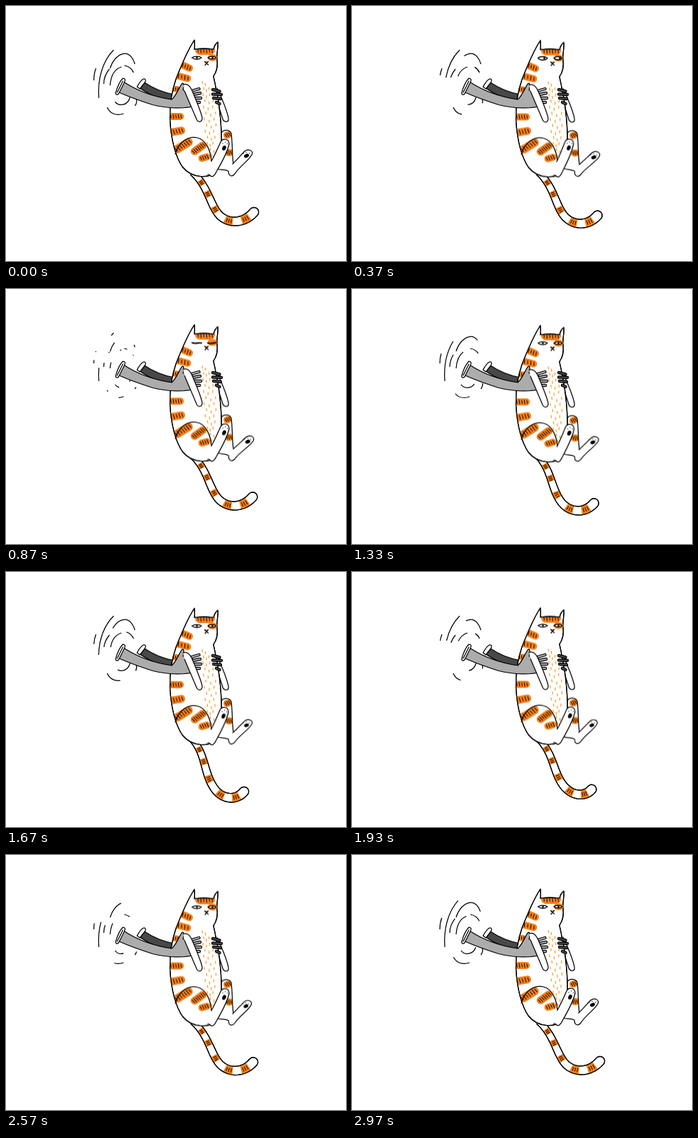
An HTML page for the animation above (3010 ms loop, 480 by 360 pixels).

```html
<!DOCTYPE html>
<html lang="en">
<head>
<meta charset="utf-8">
<title>Held cat</title>
<style>
  html, body { margin: 0; width: 100%; height: 100%; overflow: hidden; background: #fff; }
  svg { display: block; width: 480px; height: 360px; }
  .ink { stroke: #000; stroke-width: 1.25; stroke-linejoin: round; stroke-linecap: round; fill: none; }
  .white { fill: #fff; }
  .light { fill: #acacac; }
  .dark { fill: #484848; }
  .orange { fill: #f77f16; }
  .hatch { stroke: #1c0e02; stroke-width: 1.1; fill: none; }
  .fur { stroke: #f5a030; stroke-width: 1.3; fill: none; }
  .rim { stroke: #000; stroke-width: 4.4; stroke-linecap: round; }
  .skin { stroke-width: 2.2; stroke-linecap: round; }
  .bob { animation: bob 3010ms ease-in-out infinite; }
  .near { transform-origin: 293px 238px; animation: near 3010ms ease-in-out infinite; }
  .far { transform-origin: 317px 238px; animation: far 3010ms ease-in-out infinite; }
  .eye { transform-origin: 280px 73px; animation: blink 3010ms linear infinite; }
  .pupil { animation: glance 3010ms ease-in-out infinite; }
  .lid { opacity: 0; stroke-width: 1.8; animation: lid 3010ms step-end infinite; }
  .swirl path { stroke-linecap: butt; animation: sweep 1505ms linear infinite; }
  @keyframes bob { 0%, 100% { transform: translateY(0); } 46% { transform: translateY(3.4px); } }
  @keyframes near {
    0%, 29%, 72%, 100% { transform: rotate(0deg); }
    12% { transform: rotate(-3deg); }
    44% { transform: rotate(-2deg); }
  }
  @keyframes far {
    0%, 100% { transform: rotate(0deg); }
    12%, 29% { transform: rotate(4deg); }
    50% { transform: rotate(2deg) scale(0.97); }
    72% { transform: rotate(1deg) scale(0.92); }
  }
  @keyframes blink {
    0%, 6%, 38%, 100% { transform: scaleY(1); }
    11%, 23% { transform: scaleY(1.25); }
    27%, 32% { transform: scaleY(0.1); }
  }
  @keyframes glance { 0%, 6%, 36%, 100% { transform: translateX(0); } 12%, 24% { transform: translateX(2px); } }
  @keyframes lid { 0%, 32% { opacity: 0; } 26.5% { opacity: 1; } }
  /* the gap opens from each line's start, then the line regrows behind it */
  @keyframes sweep {
    0% { stroke-dasharray: 0 0 100 0; }
    43% { stroke-dasharray: 0 69 100 0; }
    62% { stroke-dasharray: 33 67 100 0; }
    100% { stroke-dasharray: 100 0 100 0; }
  }
</style>
</head>
<body>
<svg viewBox="0 0 480 360">
  <defs>
    <path id="torso" d="M266 48 C258 60 249 80 240 103 C234 120 231 140 231.500 160 C233 190 240 214 249 227 C257 237 266 240 275 240.500 C283 241 288 240 291 237 L304 200 C305 175 302 140 296 115 C295 106 293 102 293 99 C298 92 299 84 298 76 C297 66 300 58 299 51 C296 53 294 57 293 61 C284 60 275 60 266 61 C267 56 266 52 266 48 Z"/>
    <clipPath id="inTorso"><use href="#torso"/></clipPath>
    <path id="thigh" d="M239 209 C243 192 258 183 270 186 C283 189 289 205 290 219"/>
    <path id="shin" d="M298 231 L304 179 C307 174 316 174 318 180 C320 195 319 210 321 223 L314 234 Z"/>
    <clipPath id="inShin"><use href="#shin"/></clipPath>
    <path id="fingers" d="M262 120 L272.500 117 M264 125 L274 123 M264 130 L275 130 M262 136 L273 136"/>
    <path id="farFingers" d="M292 118 L301.500 120.500 M292 124.500 L304 125 M293 130 L303 131 M297 136 L301.500 138"/>
  </defs>

  <g class="ink swirl">
    <path pathLength="100" d="M131 130 C129 104 136 78 152 62"/>
    <path pathLength="100" d="M124 105 C124 98 125 93 127 88"/>
    <path pathLength="100" d="M147 88 C150 78 158 67 168 67 C175 67 180 75 182 82"/>
    <path pathLength="100" d="M138 110 C138 102 141 95 146 89"/>
    <path pathLength="100" d="M147 112 C148 98 153 89 163 86"/>
    <path pathLength="100" d="M167 84 C173 85 178 89 180 94"/>
    <path pathLength="100" d="M166 152 C155 156 146 151 143 143"/>
    <path pathLength="100" d="M154 135 C159 142 172 141 175 129"/>
    <path pathLength="100" d="M182 141 C185 137 185 134 184 131"/>
  </g>

  <g id="tail">
    <path id="tailShape" class="ink white"/>
    <path id="tailBands" class="orange"/>
    <path id="tailHatch" class="hatch"/>
    <path id="tailEdge" class="ink"/>
  </g>

  <g class="ink">
    <path class="dark" d="M194 107 C207 116 220 122 238 125 L238 134 C218 133 202 125 189 116 Z"/>
    <path class="white" d="M194 103 C197 102 198 105 196 108 L189 117 L185 114 C188 109 190 105 194 103 Z"/>
  </g>

  <g class="bob">
    <use href="#shin" fill="#fff"/>
    <g id="shinMarks" clip-path="url(#inShin)"></g>
    <path class="ink" d="M304 179 C307 174 316 174 318 180 C320 195 319 210 321 223"/>
    <g class="far">
      <path class="ink white" d="M320 223 C327 216 333 209 337 205 C342 201 350 204 347 210 C342 219 330 226 323 237 C319 242 314 240 314 233 C308 230 303 232 298 230"/>
      <ellipse cx="339.500" cy="211.500" rx="3.600" ry="2.500" transform="rotate(-25 339.500 211.500)"/>
      <path class="ink" d="M335 208h.1M339 206.500h.1M343.500 208h.1"/>
    </g>
    <path class="ink white" d="M298 116 C304 128 312 148 314 158 C315 164 310 165 306.500 161 L299 138"/>
    <use href="#torso" class="ink white"/>
    <g id="marks" clip-path="url(#inTorso)"></g>
    <path id="belly" class="fur"/>
    <use href="#torso" class="ink"/>
    <use href="#thigh" class="ink"/>

    <ellipse class="orange" cx="291.500" cy="73" rx="6.800" ry="4.800"/>
    <g class="eye">
      <g class="ink white">
        <path d="M262.500 73 C266 70.500 273 70.500 276 73 C273 76 266 76 262.500 73 Z"/>
        <path d="M285 73 C288 70.500 294 70.500 297 73 C294 75.500 288 75.500 285 73 Z"/>
      </g>
      <path class="pupil ink" d="M269 72v2M270 72v2M291 72v2M292 72v2"/>
    </g>
    <path class="lid ink" d="M263 73.500 C267 76 272 72.500 276 74 M285 74 C289 76 293 74 297 73"/>
    <path class="orange" d="M280 78 h6 l-3 4 Z"/>
    <path class="ink" d="M280.500 78.500 L283 81 L285.500 78.500 M283 81 L281 83.500 M283 81 L285.500 83"/>

    <g class="near">
      <path class="ink white" d="M290 219 C295 210 299 201 303 192 C306 186 315 187 315 195 C313 204 304 222 297 234 C295 239 291 242 289 240 C287 238 286 237 285 238"/>
      <ellipse cx="308" cy="200.500" rx="2.600" ry="3.600" transform="rotate(25 308 200.500)"/>
      <path class="ink" d="M306 194h.1M309.500 192h.1M312.500 194.500h.1"/>
    </g>
  </g>

  <path class="ink light" d="M166 107 C184 119 207 128 234 132 C240 127 244 116 248 110 C251 107 252 112 250 119 L263 122 L267 141 C254 145 228 145 207 139.500 C187 133 172 128 158 121 Z"/>
  <path class="ink white" d="M165 102 C168 102 169 104 167 108 L159 124 C157 126 154 125 155 122 C157 115 160 107 165 102 Z M165 106 L157 122"/>
  <use href="#fingers" class="rim"/>
  <use href="#fingers" class="skin" stroke="#acacac"/>
  <use href="#farFingers" class="rim"/>
  <use href="#farFingers" class="skin" stroke="#484848"/>
  <path class="bob ink white" d="M250 111 C255 109 259 112 262 118 C268 132 275 148 277 158 C277 164 272 165 269.500 161 L252 120"/>
</svg>

<script>
const $ = id => document.getElementById(id);
const LOOP = 3010;

// orange stripe with a row of dark hatch marks: x, y, width, height, angle, marks
function stripe([x, y, w, h, angle, n]) {
  let hatch = '';
  for (let i = 0; i < n; i++) {
    const hx = ((i + 0.5) / n - 0.5) * (w - 4);
    const len = h * (0.25 + 0.07 * (i % 2));
    hatch += `M${hx - 0.5} ${-len}L${hx + 0.5} ${len}`;
  }
  return `<g transform="translate(${x} ${y}) rotate(${angle})">
    <rect class="orange" x="${-w / 2}" y="${-h / 2}" width="${w}" height="${h}" rx="${h * 0.48}"/>
    <path class="hatch" d="${hatch}"/></g>`;
}

$('marks').innerHTML = [
  [281, 62, 28, 14, 0, 6],
  [253, 85, 23, 10, 25, 5],
  [248, 100, 27, 10, 15, 5],
  [238, 117, 17, 9, 8, 4],
  [240, 156, 22, 10, 0, 5],
  [241, 177, 24, 11, -10, 5],
  [250, 197, 30, 12, -32, 7],
  [272, 201, 25, 11, -35, 7],
  [280, 214, 17, 10, -15, 4]
].map(stripe).join('');
$('shinMarks').innerHTML = [[313, 182, 12, 10, -20, 3], [315, 207, 12, 10, 0, 3]].map(stripe).join('');

// belly fur: staggered rows inside a leaf shape
let fur = '';
for (let row = 0; row < 13; row++) {
  const u = row / 12, y = 106 + 103 * u;
  const left = 277 + 5 * u + 8 * u ** 6;
  const width = 4 + 13 * Math.sin(Math.PI * Math.min(1, u * 0.95 + 0.05));
  const n = width > 9 ? 3 : 2;
  for (let i = 0; i < n; i++) {
    const x = left + width * (i + 0.4 * (row % 2)) / (n - 0.6);
    fur += `M${x} ${y + 3 * (i % 2)}l${0.6 - 0.4 * (i % 3)} 4`;
  }
}
$('belly').setAttribute('d', fur);

// tail: two joined cubics; the base leads the swing and the tip follows
const RAISED = [[264, 235], [287, 255], [289, 282], [303, 296], [318, 309], [338, 305], [350, 291]];
const LOWERED = [[263, 236], [282, 258], [279, 283], [294, 304], [305, 320], [325, 323], [336, 310]];
const SWING = [[0, 0], [370, 0.25], [870, 0.13], [1330, 0.6], [1670, 1], [1800, 1.06],
  [2170, 0.38], [2600, 0.06], [LOOP, 0]];
const BANDS = [[0.17, 0.27], [0.4, 0.52], [0.74, 0.88], [1.14, 1.36], [1.6, 1.83]];
const LEAD = 250;

function swing(t) {
  const last = SWING.length - 1;
  const slope = i => i === 0 || i === last ? 0 :
    (SWING[i + 1][1] - SWING[i - 1][1]) / (SWING[i + 1][0] - SWING[i - 1][0]);
  let i = 0;
  while (i < last - 1 && t >= SWING[i + 1][0]) i++;
  const [t0, a] = SWING[i], [t1, b] = SWING[i + 1];
  const d = t1 - t0, u = (t - t0) / d, v = 1 - u;
  return a * v * v * (1 + 2 * u) + b * u * u * (3 - 2 * u) +
    d * u * v * (slope(i) * v - slope(i + 1) * u);
}

function drawTail(t) {
  const pts = RAISED.map((p, i) => {
    const k = swing((t + LEAD * (1 - i / 6)) % LOOP);
    return p.map((c, j) => c + (LOWERED[i][j] - c) * k);
  });
  // point at s (0..2), shifted sideways by a share of the half width
  const at = (s, side, turn = 0) => {
    const o = s < 1 ? 0 : 3, u = s < 1 ? s : s - 1, v = 1 - u;
    const [a, b, c, d] = pts.slice(o, o + 4);
    const pos = j => v ** 3 * a[j] + 3 * v * v * u * b[j] + 3 * v * u * u * c[j] + u ** 3 * d[j];
    const vel = j => v * v * (b[j] - a[j]) + 2 * u * v * (c[j] - b[j]) + u * u * (d[j] - c[j]);
    const ang = Math.atan2(vel(1), vel(0)) + Math.PI / 2 - turn;
    const r = (4.5 + 1.1 * s) * side;
    return (pos(0) + r * Math.cos(ang)).toFixed(2) + ' ' + (pos(1) + r * Math.sin(ang)).toFixed(2);
  };
  const run = (from, to, side, n) =>
    Array.from({ length: n + 1 }, (_, i) => at(from + (to - from) * i / n, side));
  const tip = Array.from({ length: 9 }, (_, i) => at(2, 1, Math.PI * i / 8));
  const edge = 'M' + [...run(0, 2, 1, 24), ...tip, ...run(2, 0, -1, 24)].join('L');
  let bands = '', hatch = '';
  for (const [from, to] of BANDS) {
    bands += 'M' + [...run(from, to, 1, 4), ...run(to, from, -1, 4)].join('L') + 'Z';
    for (const f of [0.25, 0.52, 0.8]) {
      const s = from + (to - from) * f;
      hatch += `M${at(s, -0.45)}L${at(s, 0.5)}`;
    }
  }
  $('tailShape').setAttribute('d', edge);
  $('tailBands').setAttribute('d', bands);
  $('tailHatch').setAttribute('d', hatch);
  $('tailEdge').setAttribute('d', edge);
}

let start;
function frame(now) {
  start ??= now;
  drawTail((now - start) % LOOP);
  requestAnimationFrame(frame);
}
drawTail(0);
requestAnimationFrame(frame);
</script>
</body>
</html>
```
